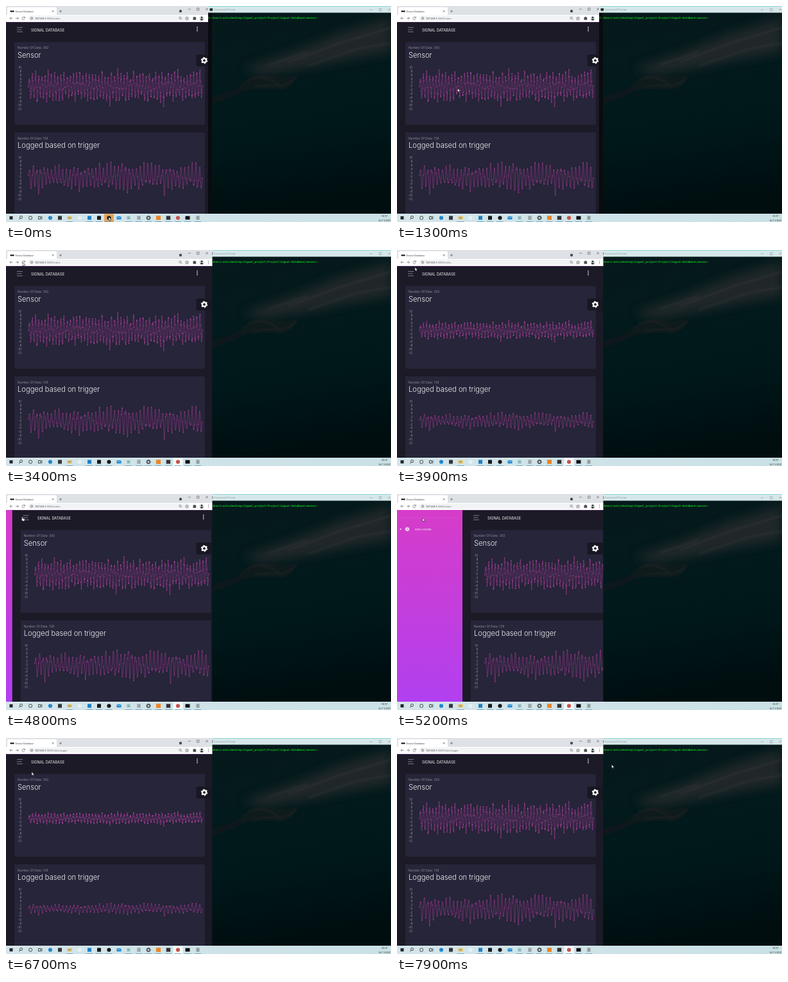
Write an HTML page that moves like this. It is 600 px wide and 338 px high and loops after 8000 ms.

```html
<!DOCTYPE html>
<html lang="en">
<head>
<meta charset="utf-8">
<title>Signal database</title>
<style>
  html, body { margin: 0; width: 100%; height: 100%; overflow: hidden; background: #000f11; }
  svg { display: block; width: 100vw; height: 100vh; }
  text { font-family: Inter, "Open Sans", sans-serif; }
  .ui { font-family: Roboto, "Liberation Sans", sans-serif; }
  .mono { font-family: "DejaVu Sans Mono", "Liberation Mono", monospace; }
  .line { fill: none; stroke: #b23c9f; stroke-width: .5; stroke-linejoin: round; }
  .dots { fill: none; stroke: #d64bbc; stroke-width: 1.25; stroke-linecap: round; }
  .thin { fill: none; stroke: #4a4d52; stroke-width: .6; }
</style>
</head>
<body>
<svg viewBox="0 0 600 338" preserveAspectRatio="none">
  <defs>
    <linearGradient id="sea" x1="0" y1="0" x2=".15" y2="1">
      <stop offset="0" stop-color="#06191b"/><stop offset=".35" stop-color="#031a1c"/>
      <stop offset=".65" stop-color="#00181a"/><stop offset="1" stop-color="#000e10"/>
    </linearGradient>
    <linearGradient id="pink" x1="0" y1="0" x2="0" y2="1">
      <stop offset="0" stop-color="#d63cc8"/><stop offset="1" stop-color="#b140f0"/>
    </linearGradient>
    <linearGradient id="bar" x1="0" x2="1">
      <stop offset="0" stop-color="#d4e5ea"/><stop offset="1" stop-color="#c9e1e5"/>
    </linearGradient>
    <filter id="soft" x="-20%" y="-50%" width="140%" height="200%"><feGaussianBlur stdDeviation="8"/></filter>
    <filter id="mild" x="-20%" y="-50%" width="140%" height="200%"><feGaussianBlur stdDeviation="1.4"/></filter>
    <clipPath id="seaClip"><rect x="321" y="11" width="279" height="314"/></clipPath>
    <clipPath id="winClip"><rect id="winRect" width="315" height="325"/></clipPath>
    <clipPath id="pageClip"><rect y="25" width="321.5" height="300"/></clipPath>
  </defs>

  <g id="terminal">
    <rect x="315" width="285" height="325" fill="#0a0b10"/>
    <rect x="321" y="10" width="279" height="315" fill="url(#sea)"/>
    <g clip-path="url(#seaClip)">
      <path d="M370 98L450 70 520 42 600 18V72L530 84 460 98 400 108Z" fill="#3d3637" opacity=".5" filter="url(#soft)"/>
      <path d="M440 88L520 58 600 34M470 94L545 68 600 58M410 92L470 72" fill="none" stroke="#514847" stroke-width="3" opacity=".22" filter="url(#mild)"/>
      <g filter="url(#mild)" opacity=".6">
        <path d="M321 145C336 134 354 134 372 122L384 126C368 134 346 146 321 153Z" fill="#14161a"/>
        <path d="M366 123C385 106 405 106 424 111 438 114 448 106 455 109 449 121 440 130 426 131 410 127 392 132 366 130Z" fill="#151b1d"/>
        <path d="M376 117C396 106 412 113 430 127M386 127C412 118 430 134 452 112" fill="none" stroke="#3a2a2c" stroke-width="1.2"/>
      </g>
    </g>
    <rect x="315" width="285" height="10.5" fill="#d6e7e9"/>
    <rect x="315" width="285" height="1" fill="#8fdadd"/>
    <rect x="317.5" y="3.6" width="4.6" height="4" fill="#20282a"/>
    <text class="ui" x="324" y="7.3" font-size="4.1" fill="#94a1a3">Command Prompt</text>
    <path class="thin" opacity=".55" d="M567 6h4M581.500 4h3.500v3.500h-3.500zM595.500 4l3.500 3.500m0-3.500l-3.500 3.500"/>
    <text class="mono" x="315.300" y="19.600" font-size="4.150" font-weight="700" fill="#0fce1c">C:\Users\nolo\Desktop\Signal_project\Project\Signal-DataBase\sensor&gt;</text>
  </g>

  <g clip-path="url(#winClip)">
    <rect width="322" height="14" fill="#dee1e6"/>
    <path d="M2 14V4q0-2 2-2H77q2 0 2 2V14Z" fill="#fff"/>
    <path d="M7.500 8.300h1.200m1.800 0h1.200" stroke="#111" stroke-width="2.200" stroke-linecap="round"/>
    <text class="ui" x="14.500" y="9.600" font-size="3.750" fill="#45484c">Sensor Database</text>
    <path class="thin" d="M71.800 6.800l2.700 2.700m0-2.700l-2.700 2.700M83 8.200h4m-2-2v4"/>
    <circle cx="272" cy="8" r="2.200" fill="#4b4e52"/>
    <path class="thin" d="M284 5h4M297.500 3.200h3.500v3.500h-3.500zM311.300 3.200l3.500 3.500m0-3.500l-3.500 3.500"/>
    <rect y="14" width="322" height="11.200" fill="#fff"/>
    <rect x="34.500" y="15" width="252" height="8.400" rx="4.200" fill="#f1f3f4"/>
    <path class="thin" d="M10.500 19.200h-4.500m2-2l-2 2 2 2M15 19.200h4.500m-2-2l2 2-2 2M29.200 18.200a2.200 2.200 0 1 0 0 2.200M29.500 16.600v2h-2"/>
    <circle class="thin" cx="40" cy="19.200" r="1.800"/><path class="thin" d="M40 18.800v1.500"/>
    <text class="ui" x="45" y="20.700" font-size="4.200" fill="#202124">127.0.0.1<tspan id="path" fill="#74777b"></tspan></text>
    <circle class="thin" cx="271.500" cy="18.700" r="1.600"/><path class="thin" d="M272.700 20l1.500 1.500"/>
    <path class="thin" d="M282 16.800l.8 1.700 1.800.2-1.300 1.200.4 1.800-1.700-.9-1.700.9.4-1.800-1.300-1.200 1.800-.2z"/>
    <path d="M291.500 17.500h1.500q.8-2 1.600 0h1.600v4.200h-4.700z" fill="#4a4d52"/>
    <circle cx="305" cy="19.200" r="3.300" fill="#c8d0cc"/>
    <path d="M302.500 21.500q2.500-3 5 0-2.500 2-5 0Z" fill="#242a2d"/><circle cx="305" cy="18" r="1.300" fill="#242a2d"/>
    <path d="M315.500 17.200h0m0 2h0m0 2h0" stroke="#4a4d52" stroke-linecap="round"/>

    <g clip-path="url(#pageClip)">
      <rect y="25" width="322" height="300" fill="#1b1a26"/>
      <g id="page"></g>
      <rect y="25" width="322" height=".7" fill="#a23aa5" opacity=".5"/>
      <g id="side">
        <rect y="25" width="102" height="300" fill="url(#pink)"/>
        <path d="M9 37.700H97" stroke="#fff" stroke-width=".5" stroke-dasharray="1 1" opacity=".4"/>
        <circle cx="5.500" cy="55" r="1" fill="#fff"/>
        <g fill="none" stroke="#fff" stroke-width=".7">
          <ellipse cx="16" cy="55" rx="3.300" ry="1.300" transform="rotate(30 16 55)"/>
          <ellipse cx="16" cy="55" rx="3.300" ry="1.300" transform="rotate(90 16 55)"/>
          <ellipse cx="16" cy="55" rx="3.300" ry="1.300" transform="rotate(150 16 55)"/>
        </g>
        <text x="28" y="56.500" font-size="3.700" fill="#fff">DATA LOGGER</text>
      </g>
      <path d="M322 76H299q-2.500 0-2.500 2.500V92q0 2.500 2.500 2.500H322Z" fill="#181722"/>
      <g fill="none" stroke="#fff">
        <circle cx="309" cy="85.200" r="3" stroke-width="2.200"/>
        <circle cx="309" cy="85.200" r="4.400" stroke-width="1.700" stroke-dasharray="2.300 2.308"/>
      </g>
    </g>
  </g>

  <g id="taskbar"></g>
  <path id="arrow" d="M0 0V5.600L1.300 4.500 2.200 6.500 3.100 6.100 2.200 4.200H4Z" fill="#fff" stroke="#111" stroke-width=".5"/>
  <path id="hand" d="M1 0q.8 0 .8 1V2.700L4 3.200q.7.200.6 1L4.200 6.800H1.200L-.6 4.200q0-.9.900-.4V1q0-1 .7-1Z" fill="#fff" stroke="#111" stroke-width=".5"/>
</svg>

<script>
const LOOP = 8000, GAP = 141.4, ZERO = 125.6, UNIT = 2.95;
const $ = id => document.getElementById(id);

function random(seed) {
  return () => (seed = (seed * 16807) % 2147483647) / 2147483647;
}

// Sine with a random height for each half wave; peaks are [x, value] pairs.
function signal(count, cycles, seed, noise, peaks) {
  const rnd = random(seed);
  const heights = Array.from({ length: 2 * cycles + 2 }, () => 4.2 + 3.8 * rnd());
  for (const [x, v] of peaks) {
    const half = Math.floor(2 * cycles * (x - 35) / 271);
    heights[half + (half % 2 === (v < 0 ? 1 : 0) ? 0 : 1)] = Math.abs(v);
  }
  return Array.from({ length: count }, (_, i) => {
    const u = i / (count - 1);
    const wave = heights[Math.floor(2 * cycles * u)] * Math.sin(2 * Math.PI * cycles * u);
    return { x: 35 + 271 * u, v: wave + (rnd() - .5) * noise };
  });
}

const charts = [
  { title: 'Sensor', count: 392, pts: signal(392, 55, 71, 2.4, [[46, -8.4], [115, 8.3], [161, -9.7], [172, 9], [245, -9.6]]) },
  { title: 'Logged based on trigger', count: 138, pts: signal(138, 47, 29, 1.6, [[48, -9], [179, 9.3], [248, -10.5]]) }
];

function card({ title, count }, i) {
  let labels = '';
  for (let v = 10; v >= -12; v -= 2)
    labels += `<text x="24.3" y="${ZERO - v * UNIT + 1.7}" font-size="4.7" text-anchor="end" fill="#93929d">${v}</text>`;
  return `<g transform="translate(0 ${i * GAP})">
    <rect x="13" y="56.300" width="297" height="129.500" rx="1.500" fill="#262539"/>
    <text x="18" y="67.300" font-size="4.800" fill="#8d8c99">Number Of Data: ${count}</text>
    <text x="18" y="81" font-size="11.200" font-weight="300" fill="#f2f2f5">${title}</text>
    ${labels}<path class="line"/><path class="dots"/></g>`;
}

$('page').innerHTML = `
  <path d="M17 33.600h9M17 37h7.500M17 40.400h9" stroke="#b9b9c2" stroke-width=".6"/>
  <text x="39" y="39.700" font-size="5.750" fill="#f4f4f6">SIGNAL DATABASE</text>
  <path d="M298 33h0m0 2.800h0m0 2.800h0" stroke="#fff" stroke-width="1.700" stroke-linecap="round"/>
  ${charts.map(card).join('')}`;
const lines = document.querySelectorAll('.line'), dots = document.querySelectorAll('.dots');

function drawChart(i, k) {
  const p = charts[i].pts.map(({ x, v }) => [x, ZERO - v * UNIT * k]);
  const fix = n => n.toFixed(2);
  let d = `M${p[0].map(fix)}`;
  for (let j = 1; j < p.length; j++) {
    const [a, b, c, e] = [p[Math.max(j - 2, 0)], p[j - 1], p[j], p[Math.min(j + 1, p.length - 1)]];
    d += 'C' + [b[0] + (c[0] - a[0]) / 6, b[1] + (c[1] - a[1]) / 6,
                c[0] - (e[0] - b[0]) / 6, c[1] - (e[1] - b[1]) / 6, ...c].map(fix);
  }
  lines[i].setAttribute('d', d);
  dots[i].setAttribute('d', p.map(q => `M${q.map(fix)}h0`).join(''));
}

// Taskbar: round or square marks at an even pitch.
const round = (x, c, r = 3.1) => `<circle cx="${x}" cy="331.500" r="${r}" fill="${c}"/>`;
const square = (x, c, w = 6, h = 6) => `<rect x="${x - w / 2}" y="${331.5 - h / 2}" width="${w}" height="${h}" fill="${c}"/>`;
const stroke = d => `<path d="${d}" fill="none" stroke="#222" stroke-width=".8"/>`;
const underlined = [99, 130, 145, 160, 191, 207, 222, 237, 253, 268, 283, 299];
$('taskbar').innerHTML = `
  <rect y="325" width="600" height="13" fill="url(#bar)"/>
  <rect id="recorder" x="153" y="325.300" width="15" height="12.700" fill="#e3a35a"/>
  <rect id="active" x="260.500" y="325.300" width="15" height="12.700" fill="#f4fafc"/>
  ${underlined.map(x => `<rect x="${x - 5.5}" y="337.200" width="11" height=".8" fill="#5b9bc4"/>`).join('')}
  ${square(8, '#24282c', 5, 5)}
  ${stroke('M25.500 330.500a2 2 0 1 0-4 0 2 2 0 1 0 4 0M22 332l-1.600 2')}
  ${stroke('M40.700 331.500a2.600 2.600 0 1 0-5.200 0 2.600 2.600 0 1 0 5.200 0')}
  ${stroke('M50.500 329.500h3.500v4h-3.500zM55.800 329v5')}
  ${round(69, '#2188cc')}${square(84, '#30363b')}
  ${square(99, '#efbd4c', 7, 5)}${square(99, '#5aa7d8', 4, 1.5)}
  ${round(114.5, '#e4f1f6')}${square(130, '#1d7fc4')}${square(145, '#15181b')}
  ${round(160.5, '#17191d')}
  ${square(176, '#1f88d0', 7, 5)}<path d="M172.500 329l3.500 2.700 3.500-2.700" stroke="#d8f0ff" stroke-width=".7" fill="none"/>
  ${square(191, '#8db9bd', 5, 5)}${square(207, '#9ba6aa', 5.5)}
  <circle cx="222" cy="331.500" r="2.300" fill="none" stroke="#42484c" stroke-width="1.500"/>
  <circle cx="222" cy="331.500" r="3.200" fill="none" stroke="#42484c" stroke-dasharray="1.250 1.263"/>
  ${square(237.5, '#ed8422', 7, 6.5)}${square(253, '#343238', 6.5)}
  ${round(268, '#c7534a')}${square(283, '#0b0e11', 7, 5.5)}${square(299, '#929da2', 5, 6)}
  <text class="ui" x="590" y="330.300" font-size="3.700" text-anchor="middle" fill="#333">02:57</text>
  <text class="ui" x="590" y="336.500" font-size="3.700" text-anchor="middle" fill="#333">16/11/2021</text>`;

const FRONT = 2800, RELOAD = 3710, OPEN = 4680, LEAVE = 6540, LOAD = 6590;
const clamp = u => Math.min(1, Math.max(0, u));
const smooth = u => u * u * u * (6 * u * u - 15 * u + 10);
const grow = u => 1 - (1 - clamp(u)) ** 4;

// [time, x, y] of the pointer tip
const pointer = [
  [600, 160, 330], [1700, 72, 60], [2500, 26, 19], [3300, 26, 19], [3850, 28, 27],
  [4550, 24.5, 35.500], [4850, 24.5, 35.500], [5200, 40, 37.500], [5900, 40, 53],
  [6900, 40, 53], [7700, 334.500, 41.500]
];

function pointerAt(t) {
  const n = pointer.findIndex(p => p[0] > t);
  if (n < 0) return pointer[pointer.length - 1].slice(1);
  const b = pointer[n], a = pointer[Math.max(n - 1, 0)];
  const u = a === b ? 0 : smooth((t - a[0]) / (b[0] - a[0]));
  return [a[1] + (b[1] - a[1]) * u, a[2] + (b[2] - a[2]) * u];
}

const show = (id, on) => $(id).setAttribute('visibility', on ? 'visible' : 'hidden');
const move = (id, x, y = 0) => $(id).setAttribute('transform', `translate(${x.toFixed(2)} ${y.toFixed(2)})`);
let drawn = -1;

function render(t) {
  const front = t >= FRONT;
  $('winRect').setAttribute('width', front ? 321.5 : 315);
  show('active', front);
  show('recorder', t < 500);
  $('path').textContent = t < LEAVE ? ':5000/index' : ':5000/data-logger';

  const shift = t < LEAVE ? 102 * smooth(clamp((t - OPEN) / 500)) : 0;
  move('page', shift);
  move('side', shift - 102);

  const k = t < RELOAD ? 1 : grow((t - (t < LEAVE ? RELOAD : LOAD)) / 1000);
  if (k !== drawn) {
    charts.forEach((_, i) => drawChart(i, k));
    drawn = k;
  }

  const [x, y] = pointerAt(t), hand = t > 4500 && t < 4950;
  move('arrow', x, y);
  move('hand', x, y);
  show('arrow', !hand);
  show('hand', hand);
}

function tick() {
  render(performance.now() % LOOP);
  requestAnimationFrame(tick);
}
tick();
</script>
</body>
</html>
```
